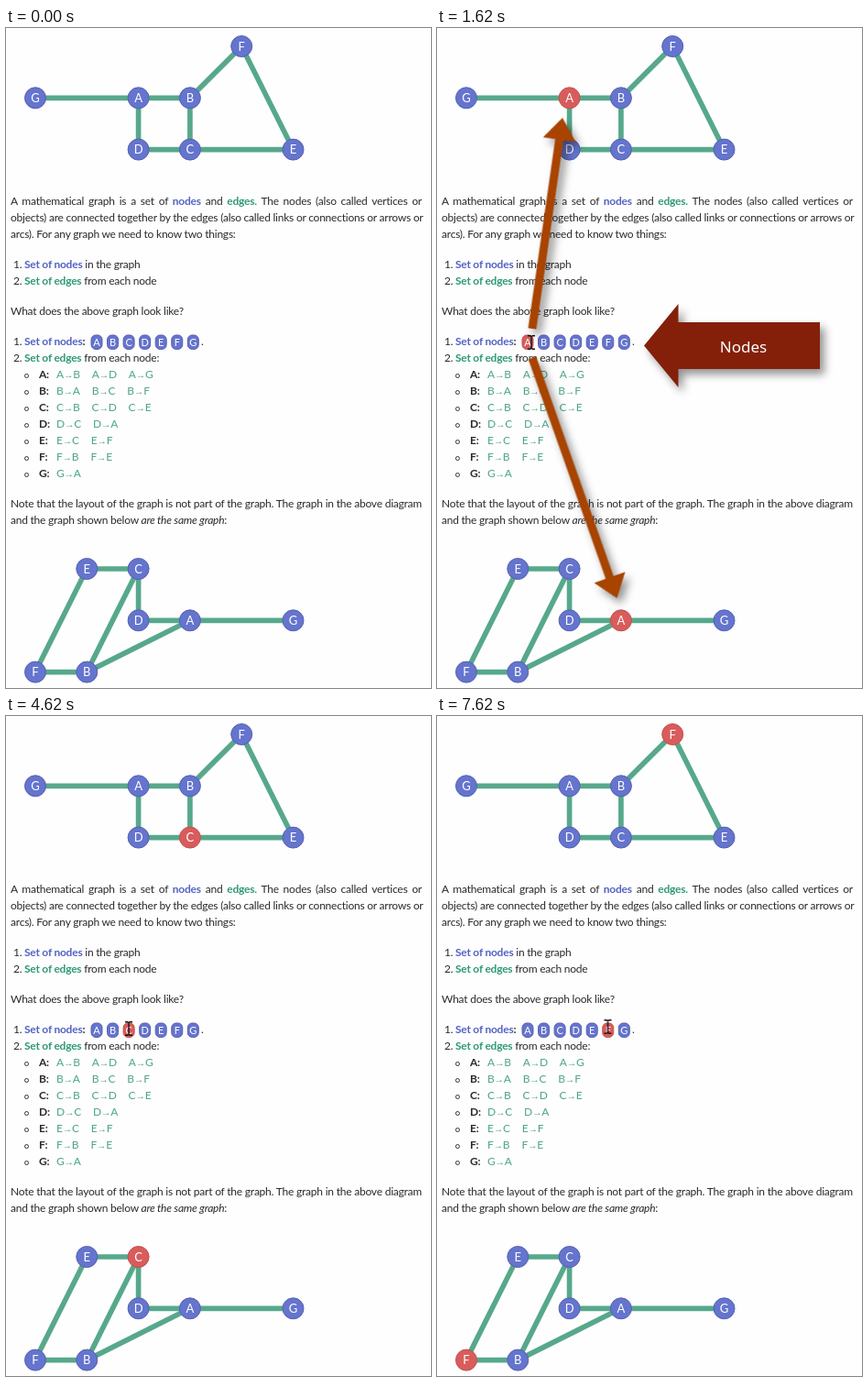
An HTML page that plays this animation: 464x720 px, repeating every 8000 ms.

```html
<!DOCTYPE html>
<html lang="en">
<head>
<meta charset="utf-8">
<title>Graph nodes</title>
<style>
  :root { --blue: #6574cd; --rim: #5661b3; --red: #d95c5c; --redrim: #c25050; --green: #57a88b; }
  html, body { margin: 0; width: 100%; height: 100%; overflow: hidden; background: #fefefe; }
  #stage { position: relative; width: 464px; height: 720px; overflow: hidden;
    font: 12px/18px Lato, "Open Sans", sans-serif; letter-spacing: -.23px; color: #2a2a2e; }
  svg { position: absolute; left: 0; top: 0; letter-spacing: 0; }
  .line { position: absolute; white-space: nowrap; }
  .full { width: 449px; text-align: justify; text-align-last: justify; }
  .nodes { color: #5262c3; font-weight: 700; }
  .edges { color: #2f9878; font-weight: 700; }
  .link { color: #4ca587; margin-right: 13px; }
  .link i { font: 10.5px/1 "Liberation Sans", sans-serif; }
  .dot { position: absolute; left: 20px; width: 3px; height: 3px; border: 1px solid #333; border-radius: 50%; }
  .edge { stroke: var(--green); stroke-width: 5.7; }
  .node { fill: var(--blue); stroke: var(--rim); animation: 8s step-end infinite; }
  .letter { fill: #fff; text-anchor: middle; }

  .A { animation-name: hotA; }
  .B { animation-name: hotB; }
  .C { animation-name: hotC; }
  .D { animation-name: hotD; }
  .E { animation-name: hotE; }
  .F { animation-name: hotF; }
  .G { animation-name: hotG; }
  @keyframes hotG { 11% { fill: var(--red); stroke: var(--redrim); } 11.8% { fill: var(--blue); stroke: var(--rim); } }
  @keyframes hotA { 16.25% { fill: var(--red); stroke: var(--redrim); } 28.5% { fill: var(--blue); stroke: var(--rim); } }
  @keyframes hotB { 29.25% { fill: var(--red); stroke: var(--redrim); } 45.25% { fill: var(--blue); stroke: var(--rim); } }
  @keyframes hotC { 46% { fill: var(--red); stroke: var(--redrim); } 59.25% { fill: var(--blue); stroke: var(--rim); } }
  @keyframes hotD { 60% { fill: var(--red); stroke: var(--redrim); } 76% { fill: var(--blue); stroke: var(--rim); } }
  @keyframes hotE { 79.75% { fill: var(--red); stroke: var(--redrim); } 91% { fill: var(--blue); stroke: var(--rim); } }
  @keyframes hotF { 92.25% { fill: var(--red); stroke: var(--redrim); } 100% { fill: var(--red); stroke: var(--redrim); } }

  /* Shape and shadow fade separately, so the shadow shows through the shape */
  .callout { opacity: 0; animation: callout 8s linear infinite; }
  .pointers { opacity: 0; animation: pointers 8s linear infinite; }
  .shadow path { fill: #000; fill-opacity: .42; }
  .shadow { filter: blur(5px); }
  .shift { transform: translate(5px, 6px); }
  @keyframes callout { 0%, 11% { opacity: 0; } 16.75%, 41.1% { opacity: 1; } 46.6%, 100% { opacity: 0; } }
  @keyframes pointers { 0%, 18% { opacity: 0; } 20.25%, 27.1% { opacity: 1; } 30.25%, 100% { opacity: 0; } }

  #cursor { fill: none; stroke: #111; stroke-width: 1.4;
    animation: travel 8s linear infinite, appear 8s step-end infinite; }
  @keyframes appear { 0% { opacity: 0; } 11%, 100% { opacity: 1; } }
  @keyframes travel {
    0%, 11% { transform: translate(204px, 347px); }
    11.8% { transform: translate(190px, 357px); }
    13.25%, 14.5% { transform: translate(91.5px, 350px); }
    17.5%, 27.1% { transform: translate(103px, 343px); }
    30.5%, 33.5% { transform: translate(115.5px, 343px); }
    34%, 41.4% { transform: translate(116.5px, 343px); }
    43.9% { transform: translate(120.5px, 343px); }
    48.5%, 57.75% { transform: translate(134px, 341px); }
    62%, 75% { transform: translate(154px, 339px); }
    77.5%, 79.25% { transform: translate(162px, 337px); }
    80.5%, 88.75% { transform: translate(169px, 339px); }
    94.5%, 100% { transform: translate(186.5px, 339px); }
  }
</style>
</head>
<body>
<div id="stage"></div>
<script>
const links = { A: 'BDG', B: 'ACF', C: 'BDE', D: 'CA', E: 'CF', F: 'BE', G: 'A' };
const names = Object.keys(links);

// Grid layouts: column and row of each node
const upper = { G: [0, 1], A: [2, 1], B: [3, 1], C: [3, 2], D: [2, 2], E: [5, 2], F: [4, 0] };
const lower = { E: [1, 0], C: [2, 0], D: [2, 1], A: [3, 1], G: [5, 1], F: [0, 2], B: [1, 2] };

const line = (y, html, x = 5, kind = '') =>
  `<div class="line ${kind}" style="left:${x}px;top:${y - 10}px">${html}</div>`;
const letter = (name, x, y, size) =>
  `<text class="letter" x="${x}" y="${y}" font-size="${size}">${name}</text>`;

function graph(layout, top) {
  const at = n => [32 + layout[n][0] * 56.3, top + layout[n][1] * 56.3];
  let edges = '', nodes = '';
  for (const a of names) {
    const [x, y] = at(a);
    for (const b of links[a]) {
      if (a > b) continue;
      const [u, v] = at(b);
      edges += `<line class="edge" x1="${x}" y1="${y}" x2="${u}" y2="${v}"/>`;
    }
    nodes += `<circle class="node ${a}" cx="${x}" cy="${y}" r="11.5"/>` + letter(a, x, y + 4.6, 13);
  }
  return edges + nodes;
}

function pill(name, i) {
  const x = 99 + i * 17.55;
  return `<rect class="node ${name}" x="${x - 6}" y="335" width="12" height="15.5" rx="5"/>` + letter(name, x, 347, 11);
}

function pointer(x, y, tipX, tipY) {
  const length = Math.hypot(tipX - x, tipY - y), neck = length - 24;
  const angle = Math.atan2(tipY - y, tipX - x) * 180 / Math.PI;
  return `<path transform="translate(${x} ${y}) rotate(${angle})"
    d="M0-4.5H${neck}V-18L${length} 0L${neck} 18V4.5H0Z"/>`;
}

const shaded = (kind, color, shape, label = '') =>
  `<g class="${kind}"><g class="shadow"><g class="shift">${shape}</g></g></g>
   <g class="${kind}" fill="${color}">${shape}${label}</g>`;

const setOf = kind => `<span class="${kind}">Set of ${kind}</span>`;
const rows = names.map((a, i) => {
  const y = 379 + i * 18;
  const items = [...links[a]].map(b => `<span class="link">${a}<i>→</i>${b}</span>`).join('');
  return `<div class="dot" style="top:${y - 2}px"></div>` + line(y, `<b>${a}:</b>`, 36) + line(y, items, 55);
}).join('');

document.getElementById('stage').innerHTML =
  line(190, 'A mathematical graph is a set of <span class="nodes">nodes</span> and <span class="edges">edges.</span> The nodes (also called vertices or', 5, 'full') +
  line(208, 'objects) are connected together by the edges (also called links or connections or arrows or', 5, 'full') +
  line(226, 'arcs). For any graph we need to know two things:') +
  line(259, '1.', 8) + line(259, setOf('nodes') + ' in the graph', 20) +
  line(277, '2.', 8) + line(277, setOf('edges') + ' from each node', 20) +
  line(310, 'What does the above graph look like?') +
  line(343, '1.', 8) + line(343, setOf('nodes') + '<b>:</b>', 20) + line(343, '.', 213) +
  line(361, '2.', 8) + line(361, setOf('edges') + ' from each node:', 20) +
  rows +
  line(520, 'Note that the layout of the graph is not part of the graph. The graph in the above diagram', 5, 'full') +
  line(538, 'and the graph shown below <em>are the same graph</em>:') +
  `<svg width="464" height="720" viewBox="0 0 464 720">
    ${graph(upper, 20)}
    ${graph(lower, 590)}
    ${names.map(pill).join('')}
    ${shaded('callout', '#84200a', '<path d="M226 346.5L263.5 301V321H418V372H263.5V392Z"/>',
      '<text x="334.5" y="353.5" fill="#fff" text-anchor="middle" font-size="17" font-family="Noto Sans, sans-serif">Nodes</text>')}
    ${shaded('pointers', '#a84300', pointer(104, 328, 137, 98) + pointer(104, 360, 196.5, 622))}
    <path id="cursor" d="M-4-7.3H-1.5L0-6.3L1.5-7.3H4M0-6.3V6.3M-4 7.3H-1.5L0 6.3L1.5 7.3H4"/>
  </svg>`;
</script>
</body>
</html>
```
